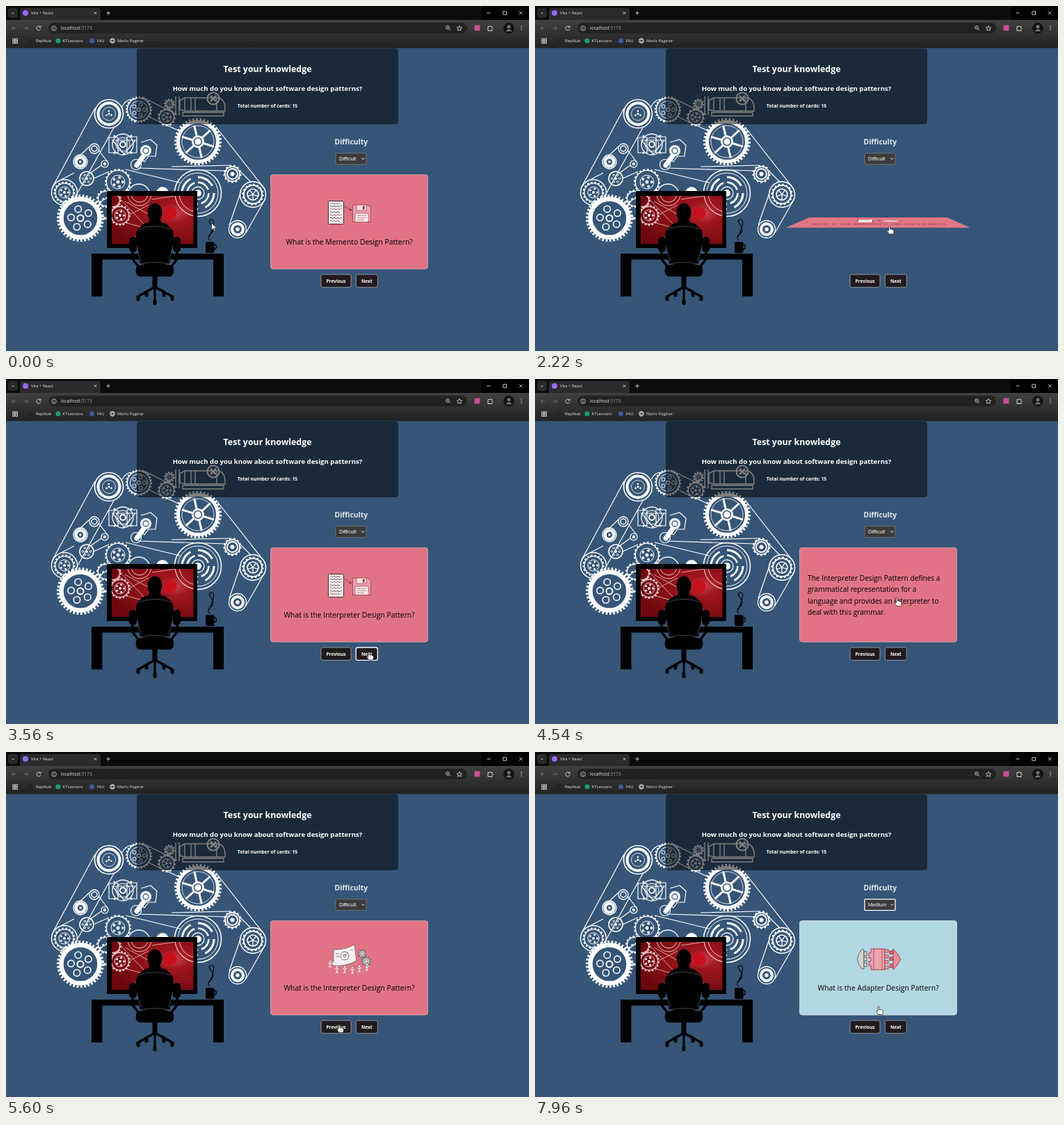
Write an HTML page that moves like this. It is 752 px wide and 496 px high and loops after 8000 ms.

```html
<!DOCTYPE html>
<html lang="en">
<head>
<meta charset="utf-8">
<title>Flashcards</title>
<style>
  html, body { margin: 0; width: 100%; height: 100%; overflow: hidden; background: #365577; }
  svg { position: absolute; overflow: visible; font-family: "Open Sans", "Noto Sans", sans-serif; }
  #stage { left: 0; top: 0; width: 752px; height: 496px; }
  #card { position: absolute; left: 380px; top: 242px; width: 227px; height: 136.5px; transform-style: preserve-3d; }
  #card svg { left: 0; top: 0; width: 227px; height: 136.5px; backface-visibility: hidden; }
  #back { transform: rotateX(180deg); }
  #pointer { left: 0; top: 0; width: 1px; height: 1px; }
  .bold { font-weight: 700; fill: #fff; text-anchor: middle; }
  .button rect { fill: #211a1f; stroke: #a9a9ad; stroke-width: .8; }
  .button.focus rect { stroke: #fff; stroke-width: 1.3; }
  .face { fill: #e17484; stroke: #cfb3ba; stroke-width: .8; }
  .medium .face { fill: #b2d8e4; stroke: #d5e5ea; }
</style>
</head>
<body>
<svg id="stage" viewBox="0 0 752 496"></svg>
<div id="card">
  <svg id="front">
    <rect class="face" x=".4" y=".4" width="226.2" height="135.7" rx="4"/>
    <g id="pictures"></g>
    <text id="question" x="113.6" y="101" font-size="10.37" text-anchor="middle"></text>
  </svg>
  <svg id="back">
    <rect class="face" x=".4" y=".4" width="226.2" height="135.7" rx="4"/>
    <g id="answer"></g>
  </svg>
</div>
<svg id="pointer">
  <path id="arrow" d="M0 0V10L2.4 7.8 4 11.3 5.6 10.6 4 7.2H7.2Z" fill="#fff" stroke="#111" stroke-width=".6"/>
  <path id="hand" d="M-1 1Q0-.6 1 1V5Q2 4 3 5.2 4.2 4.6 5 5.8 6.6 5.6 6.5 7.5V9Q6 10 5.6 12H-.5Q-1.5 10-3.3 7.6-3.6 6-1 7.2Z" fill="#fff" stroke="#111" stroke-width=".7"/>
</svg>
<script>
const $ = id => document.getElementById(id);

// Drawing helpers
const rect = (x, y, w, h, fill, rx = 0, more = '') =>
  `<rect x="${x}" y="${y}" width="${w}" height="${h}" fill="${fill}" rx="${rx}" ${more}/>`;
const ring = (x, y, r, w = 1.3, more = '') =>
  `<circle cx="${x}" cy="${y}" r="${r}" fill="none" stroke-width="${w}" ${more}/>`;
const dot = (x, y, r, fill = '#fff') => `<circle cx="${x}" cy="${y}" r="${r}" fill="${fill}" stroke="none"/>`;
const line = (d, w = 1.2, more = '') => `<path d="${d}" fill="none" stroke-width="${w}" ${more}/>`;
const shape = (d, fill = '#000', more = '') => `<path d="${d}" fill="${fill}" ${more}/>`;
const text = (x, y, size, words, more = 'fill="#e8e8e8"') =>
  `<text x="${x}" y="${y}" font-size="${size}" ${more}>${words}</text>`;
const around = (x, y, d, n, draw, start = 0) => Array.from({ length: n }, (_, i) => {
  const a = start + i * 2 * Math.PI / n;
  return draw(+(x + d * Math.cos(a)).toFixed(2), +(y + d * Math.sin(a)).toFixed(2));
}).join('');
const teeth = (x, y, r, n, w) => ring(x, y, r - w / 2, w, `pathLength="${2 * n}" stroke-dasharray="1"`);
const gear = (x, y, r, n = 16, w = 1.3) => teeth(x, y, r, n, 2.2) + ring(x, y, r - 2.4, w);
const cog = (x, y, r, n = 16) => gear(x, y, r, n) + ring(x, y, r * .52, 1) +
  around(x, y, r * .36, 5, (a, b) => dot(a, b, r * .1)) + dot(x, y, r * .13);
const spokes = (x, y, r, n, w) => around(x, y, r, n, (a, b) => line(`M${x} ${y}L${a} ${b}`, w), .3);

const browser = `
  <linearGradient id="bar" x2="0" y2="1"><stop stop-color="#404042"/><stop offset="1" stop-color="#222223"/></linearGradient>
  ${rect(0, 0, 752, 20.5, '#0b0b0c')}${rect(684, 0, 68, 20, '#000')}
  ${rect(3, 3, 14, 14, '#29292b', 4)}${rect(20, 3, 116, 18, '#2b2b2d', 4)}
  ${rect(0, 20, 752, 40.5, 'url(#bar)')}${rect(61, 24, 602, 15.5, '#222225', 7.7)}
  ${dot(28, 10, 4, '#9867f0')}
  ${text(36, 12.3, 5.95, 'Vite + React')}
  ${text(79, 34.2, 6.67, 'localhost<tspan fill="#9b9b9e">:5173</tspan>')}
  ${dot(35, 50, 3.4, '#252525')}${text(43, 52.2, 5.9, 'RepNub')}
  ${dot(75, 50, 3.6, '#17a06a')}${text(81.5, 52.2, 5.9, 'K7Lessons')}
  ${dot(123.5, 50, 3.6, '#355d98')}${text(130.5, 52.2, 5.9, 'FAU')}
  ${text(160, 52.2, 5.9, 'Marlo Paginer')}
  <g stroke="#dedede">
    ${line('M8.5 9.5 10 11 11.5 9.5M126.8 8.3 130.2 11.7M130.2 8.3 126.8 11.7M144.3 10H149.7M147 7.3V12.7M691.5 10H696.5M714.8 7.8H719.5V12.3H714.8ZM738 7.7 742.5 12.3M742.5 7.7 738 12.3', .9)}
    ${line('M14 32H8.5M11 29.4 8.4 32 11 34.6M26 32H31.5M29 29.4 31.6 32 29 34.6', .9, 'stroke="#77777a"')}
    ${line('M49.3 30A3 3 0 1 0 50 32.5M50 28.5V30.7H47.8', .9)}
    ${ring(69, 32, 3.3, .8)}${line('M69 31.5V33.8M69 30V30.7', .9)}
    ${ring(635, 31, 2.4, .8)}${line('M637 33 639 35M634 31H636', .8)}
    ${line('M652 28.3 653.1 30.8 655.8 31 653.7 32.8 654.4 35.4 652 34 649.6 35.4 650.3 32.8 648.2 31 650.9 30.8Z', .8)}
    ${line('M693 29.5H695Q696 27 697 29.5H699V31.5Q701 32.5 699 33.5V35.5H693Z', 1)}
    ${[9.8, 13.8].map(x => [47, 51].map(y => rect(x, y, 2.7, 2.7, 'none', 0, 'stroke-width=".9"')).join('')).join('')}
    ${ring(153, 50, 3.4, .9)}${line('M150 48.5H156M150 51.5H156M153 46.6Q149.5 50 153 53.4 156.5 50 153 46.6', .7)}
  </g>
  ${rect(673.5, 27.5, 8, 8, '#c84f96', 1)}
  ${dot(723, 31.7, 7.8, '#111214')}${dot(723, 29.8, 2.5, '#77736e')}${shape('M718.5 36.5Q723 29.5 727.5 36.5Z', '#77736e')}
  ${[29, 31.6, 34.2].map(y => dot(741, y, .75, '#ddd')).join('')}`;

const machine = `<g stroke="#fff">
  ${line('M128 147 67 260M155 175 101 272M166 146Q172 134 182 134M207 160 252 181M196 131 246 156M302 174 372 263M373 277 345 326M338 266 321 315M190 233 318 237M238 231 322 229M337 238 352 253M120 202 99 222M133 207 146 224M126 248 148 238M120 241 137 229M172 235 250 254M98 240 73 253')}
  ${ring(148, 155, 20.5, 1.7)}${ring(148, 155, 15.5, 4)}${ring(148, 155, 9.5, .8)}${around(148, 155, 4, 3, (a, b) => dot(a, b, 1.3), .5)}${dot(148, 155, 1.5)}
  ${gear(191, 149, 19, 24, 1.4)}${ring(191, 149, 12.5, 1)}${around(191, 149, 8, 5, (a, b) => ring(a, b, 2.5, 1))}${ring(191, 149, 2.5)}
  ${cog(231, 160, 13, 13)}${cog(235, 141, 8, 10)}
  ${line('M257 132H306Q316 135 315 151H257ZM250 136V149L257 151V132ZM244 130V157M249 130V157M266 132V151M272 132V151M303 132V151M254 153H313V158H254ZM275 151V153M297 151V153', 1.4)}
  ${ring(298, 133, 8.5, 2.2)}${line('M294 129 302 137M302 129 294 137', 2.6)}
  ${line('M148 189H161V211H148ZM174 188H188V211H174ZM153 193 170 213 186 193ZM194 196 208 192 217 200 215 216H205L199 224 192 218')}
  ${ring(168, 199, 15)}${ring(168, 199, 10, 1)}${ring(168, 199, 4, 2)}${around(168, 199, 17, 4, (a, b) => dot(a, b, 1.6), .78)}
  ${line('M204 207 188 229', 7, 'stroke-linecap="round"')}${dot(201, 208, 8)}${ring(201, 208, 4, 1.3, 'stroke="#365577"')}${ring(187, 228, 7.5, 1.2)}
  ${teeth(276, 195, 34, 38, 4)}${ring(276, 195, 28.5, 5)}${ring(276, 195, 23, .8)}${spokes(276, 195, 24, 6, 3)}${dot(276, 195, 9)}${ring(276, 195, 5.5, 1.5, 'stroke="#365577"')}
  ${ring(276, 269, 33.5, 1.6)}${ring(276, 269, 29, 1)}${ring(276, 269, 23, 3, 'pathLength="4" stroke-dasharray=".7 .3"')}${ring(276, 269, 15.5, 2.6, 'pathLength="4" stroke-dasharray=".8 .2"')}${ring(276, 269, 9)}${dot(276, 269, 5)}
  ${gear(325.5, 241.5, 13, 13, 1.6)}${ring(325.5, 241.5, 7.5, 2)}${dot(325.5, 241.5, 3)}
  ${ring(355, 271, 18.5, 1.5)}${gear(355, 271, 15.5, 16, 1.8)}${ring(355, 271, 8, 1.6)}${spokes(355, 271, 8, 5, 1.3)}
  ${ring(333, 321, 12.5)}${ring(333, 321, 8, 4)}${dot(333, 321, 2.8)}
  ${ring(84, 268, 18.5, 1.5)}${cog(84, 268, 15.5, 17)}
  ${ring(107, 224, 10)}${ring(107, 224, 6.5, 4.5)}${dot(107, 224, 1.7)}
  ${ring(127, 205, 7)}${ring(127, 205, 4, 1.5)}${ring(142, 227, 5, 1.2)}${dot(142, 227, 2.2)}
  ${ring(116, 248, 10, 1.6)}${around(116, 248, 5.5, 6, (a, b) => ring(a, b, 1.3, 1))}${dot(116, 248, 2)}
  ${teeth(107, 305, 34, 38, 4)}${ring(107, 305, 27.5, 6.5)}${around(107, 305, 13.5, 5, (a, b) => ring(a, b, 4.7, 1.6), .7)}${ring(107, 305, 4.5, 2)}
  ${cog(161, 253, 19, 20)}${gear(143, 277, 13, 14)}${gear(148, 291, 17, 17)}${dot(225, 269, 9)}${ring(191, 272, 16)}
</g>`;

const worker = `
  <radialGradient id="screen" cx=".76" cy=".36" r=".8"><stop stop-color="#c9474e"/><stop offset=".25" stop-color="#a0161e"/><stop offset="1" stop-color="#6d080e"/></radialGradient>
  <clipPath id="glass"><rect x="152" y="273" width="117.5" height="69"/></clipPath>
  ${rect(145, 266, 130, 82, '#000', 1)}${rect(152, 273, 117.5, 69, 'url(#screen)')}
  <g clip-path="url(#glass)" stroke="#ecc9cc">
    ${cog(164, 301, 15, 17)}${gear(154, 279, 12, 14)}${ring(192, 270, 17, 1)}${ring(192, 270, 12, 1)}${ring(276, 269, 33, 1.2)}${ring(276, 269, 27, 1)}
    ${line('M171 281 204 299M178 300 205 286M160 273 198 313M210 278 244 273M174 312 196 318', .8)}
  </g>
  ${dot(236, 298, 9.5, '#c8101c')}
  ${rect(123, 356, 190, 8.5, '#000')}${rect(123, 363, 15.5, 54.5, '#000')}${rect(298, 363, 15, 54.5, '#000')}
  <ellipse cx="214" cy="297" rx="10.5" ry="13.5"/>
  ${shape('M207 304H221L223 311Q234 312 237 322L240 345H188L191 322Q194 312 205 311Z')}
  ${shape('M193 318Q214 310 235 318 242 321 241 336L235 371H193L187 336Q186 321 193 318Z')}
  ${shape('M188 374Q214 366 240 374 244 386 236 389H192Q184 386 188 374Z')}
  ${line('M190 321Q214 312 238 321M186 330Q188 354 195 367M242 330Q240 354 233 367M192 371Q214 366 236 371', .7, 'stroke="#5c666f"')}
  ${rect(177, 332, 11, 22, '#000', 5)}${rect(240, 332, 11, 22, '#000', 5)}
  ${line('M182 350V364L194 379M246 350V364L234 379', 3.5, 'stroke="#000"')}
  ${rect(210.5, 388, 7, 17, '#000')}
  ${line('M214 404 191 417M214 404 238 417M214 404V424M214 404 201 411M214 404 228 411', 3.2, 'stroke="#000" stroke-linecap="round"')}
  ${[[190, 420], [239, 420], [214, 426], [202, 414], [227, 414]].map(([x, y]) => rect(x - 2.5, y - 4, 5, 8, '#000', 2)).join('')}
  ${rect(287, 339, 12.5, 16, '#000', 2)}${ring(299, 346, 3.5, 1.5, 'stroke="#000"')}
  ${line('M293 337Q288 333 294 328T297 318 292 309Q296 305 298 308T296 322 292 331', 1.1, 'stroke="#000"')}`;

const button = (id, x, w, label) => `<g id="${id}" class="button">${rect(x, 386, w, 18.3, '', 2.5)}
  ${text(x + w / 2, 398, 6.6, label, 'class="bold"')}</g>`;

$('stage').innerHTML = rect(0, 0, 752, 496, '#365577') + machine + worker +
  rect(188, 61, 376, 109, '#000', 4, 'opacity=".5"') + browser +
  text(376, 95, 12.36, 'Test your knowledge', 'class="bold"') +
  text(376, 122.3, 9.64, 'How much do you know about software design patterns?', 'class="bold"') +
  text(376, 146, 6.86, 'Total number of cards: 15', 'class="bold"') +
  text(496.3, 198.7, 10.3, 'Difficulty', 'class="bold" style="fill:#e3e8ee"') +
  rect(474, 211.7, 44, 16, '#3b3b3b', 1, 'id="select"') +
  text(479, 222.4, 7.5, '', 'id="level" fill="#fff" font-family="Liberation Sans, Arial, sans-serif"') +
  line('M511.3 218.6 513.3 220.6 515.3 218.6', 1, 'stroke="#fff"') +
  button('previous', 453, 43, 'Previous') + button('next', 503.3, 31, 'Next');

// Card pictures, in a box of 64 by 44
const wave = (x, y, n) => `M${x} ${y}q1.2-1.5 2.4 0` + 't2.4 0'.repeat(n - 1);
const person = (x, y) => dot(x, y, 1.8, '#f5f0f0') + ring(x, y, 1.8, .5) +
  line(`M${x} ${y + 2}V${y + 6}L${x - 1.5} ${y + 9}M${x} ${y + 6}L${x + 1.5} ${y + 9}M${x - 2.5} ${y + 2}L${x} ${y + 4} ${x + 2.5} ${y + 2}`, 1.4, 'stroke="#e9e2e3"');
const paleGear = (x, y, r, n) => dot(x, y, r - 1, '#e6dcde') + gear(x, y, r, n, .7) + ring(x, y, r * .35, .7);
const pictures = {
  Memento: `${rect(1.5, 4.5, 22, 33, '#f7f1ef', 1, 'stroke="#222" stroke-width=".9"')}
    ${[8, 12, 16, 20.5, 24.5, 29, 33].map((y, i) => line(wave(4, y, i % 3 ? 7 : 6), .9, `stroke="${i % 2 ? '#333' : '#963b47'}"`)).join('')}
    ${line('M25 12 33 17', .9, 'stroke="#333" stroke-dasharray="2 1"')}${shape('M35 18.5 31.5 17.8 33.4 15.3Z', '#333')}
    ${shape('M36.5 10H58L62.5 14V34.5H36.5Z', '#ef9dac', 'stroke="#8c3946" stroke-width=".8"')}
    ${rect(42, 10, 14, 8, '#f5dce0', 0, 'stroke="#8c3946" stroke-width=".6"')}${rect(51, 11.5, 2.5, 5, '#8c3946')}
    ${rect(40, 22, 19, 12.5, '#f7e6e8', 0, 'stroke="#8c3946" stroke-width=".6"')}${line('M43 25.5H56M43 28.5H56M43 31.5H53', .8, 'stroke="#c27885"')}`,
  Interpreter: `<g stroke="#555">${shape('M9 8Q24 9 39 1L42 24Q26 33 9 31Q4 28 9 25Z', '#f3eff0', 'stroke-width=".7"')}
    ${ring(25, 17, 6, .8)}${ring(25, 17, 2, .8)}${line('M25 17 30 11M12 14H17M13 18H17M33 9 37 8', .7)}
    ${paleGear(50, 14, 6.5, 11)}${paleGear(56, 25, 7, 11)}
    ${person(4, 25)}${person(14, 33)}${person(25, 33)}${person(36, 34)}${person(46, 32)}${person(57, 30)}</g>`,
  Adapter: `<g stroke="#52565c" stroke-width=".9">${shape('M8 8Q-5 22 8 36H11V8Z', '#d5d1c9')}
    ${[11, 19, 27].map(y => rect(11, y, 4, 5.5, '#d5d1c9')).join('')}</g>
    <g stroke="#a22b3c" stroke-width=".9">${shape('M21 7H41V37H21V31H18V25H21V20H18V13H21Z', '#eda5b0')}${line('M25 7V37M37 7V37', .7)}
    ${[8, 16, 24, 32].map(y => rect(41, y, 5, 4, '#eda5b0')).join('')}
    ${[10, 19, 29].map(y => rect(48, y, 5, 4.5, '#df6c7d')).join('')}${shape('M53 7Q59 13 64 22Q59 31 53 37Z', '#e8909c')}</g>`
};
const answers = {
  Memento: ['The Memento Design Pattern provides the', 'ability to restore an object to its previous', 'state (undo via rollback).'],
  Interpreter: ['The Interpreter Design Pattern defines a', 'grammatical representation for a', 'language and provides an interpreter to', 'deal with this grammar.']
};
const block = lines => lines.map((words, i) => text(12, 72.6 + (i - (lines.length - 1) / 2) * 16.4, 10.18, words, '')).join('');

$('pictures').innerHTML = Object.entries(pictures).map(([name, art]) => `<g id="pic${name}" transform="translate(82 34)">${art}</g>`).join('');
$('answer').innerHTML = Object.entries(answers).map(([name, lines]) => `<g id="answer${name}">${block(lines)}</g>`).join('');

// Time in ms and the pointer's tip
const route = [
  [60, 295.5, 312], [340, 440, 330], [580, 440, 330], [660, 452, 328], [980, 452, 328], [1520, 509.5, 316],
  [3250, 509.5, 316], [3480, 522, 392], [3620, 522, 392], [3800, 520.5, 314.5],
  [5230, 520.5, 314.5], [5520, 479, 391.5], [6180, 479, 391.5], [6980, 512, 231],
  [7200, 509, 219], [7340, 504, 239], [7780, 504, 239], [7940, 494, 365.5]
];
const flips = [2138, 2947, 4138, 4898], flipTime = 300;

function ease(x) { // cubic-bezier(.25, .1, .25, 1)
  const bezier = (a, b, s) => 3 * a * s * (1 - s) ** 2 + 3 * b * s * s * (1 - s) + s ** 3;
  let low = 0, high = 1;
  for (let i = 0; i < 24; i++) {
    const mid = (low + high) / 2;
    if (bezier(.25, .25, mid) < x) low = mid; else high = mid;
  }
  return bezier(.1, 1, low);
}
const progress = (t, from, length) => Math.min(1, Math.max(0, (t - from) / length));

function tipAt(t) {
  const i = route.findIndex(stop => stop[0] > t);
  if (i === 0) return route[0].slice(1);
  if (i < 0) return route.at(-1).slice(1);
  const [t0, x0, y0] = route[i - 1], [t1, x1, y1] = route[i];
  const p = progress(t, t0, t1 - t0), s = p * p * (3 - 2 * p);
  return [x0 + (x1 - x0) * s, y0 + (y1 - y0) * s];
}
const show = (id, on) => { $(id).style.display = on ? '' : 'none'; };

function draw(now) {
  const t = now % 8000, medium = t >= 7800;
  const topic = medium ? 'Adapter' : t >= 3545 && t < 5720 ? 'Interpreter' : 'Memento';
  const picture = medium ? 'Adapter' : t >= 3620 && t < 5770 ? 'Interpreter' : 'Memento';
  const answer = t < 3545 ? 'Memento' : 'Interpreter';
  $('question').textContent = `What is the ${topic} Design Pattern?`;
  for (const name in pictures) show('pic' + name, name === picture);
  for (const name in answers) show('answer' + name, name === answer);

  const angle = flips.reduce((sum, start) => sum + 180 * ease(progress(t, start, flipTime)), 0);
  $('card').style.transform = `perspective(470px) rotateX(${angle}deg)`;
  $('card').classList.toggle('medium', medium);

  $('next').classList.toggle('focus', t >= 3540 && t < 4140);
  $('previous').classList.toggle('focus', t >= 5720 && t < 7200);
  const selected = t >= 7200;
  $('select').setAttribute('stroke', selected ? '#fff' : '#858585');
  $('select').setAttribute('stroke-width', selected ? 1.3 : .7);
  $('level').textContent = medium ? 'Medium' : 'Difficult';

  const [x, y] = tipAt(t);
  const clickable = x > 380 && (y > 242 && y < 378 || y > 386);
  $('pointer').style.transform = `translate(${x}px, ${y}px)`;
  show('hand', clickable);
  show('arrow', !clickable);
}
const begin = performance.now();
function tick() {
  draw(performance.now() - begin);
  requestAnimationFrame(tick);
}
tick();
</script>
</body>
</html>
```
